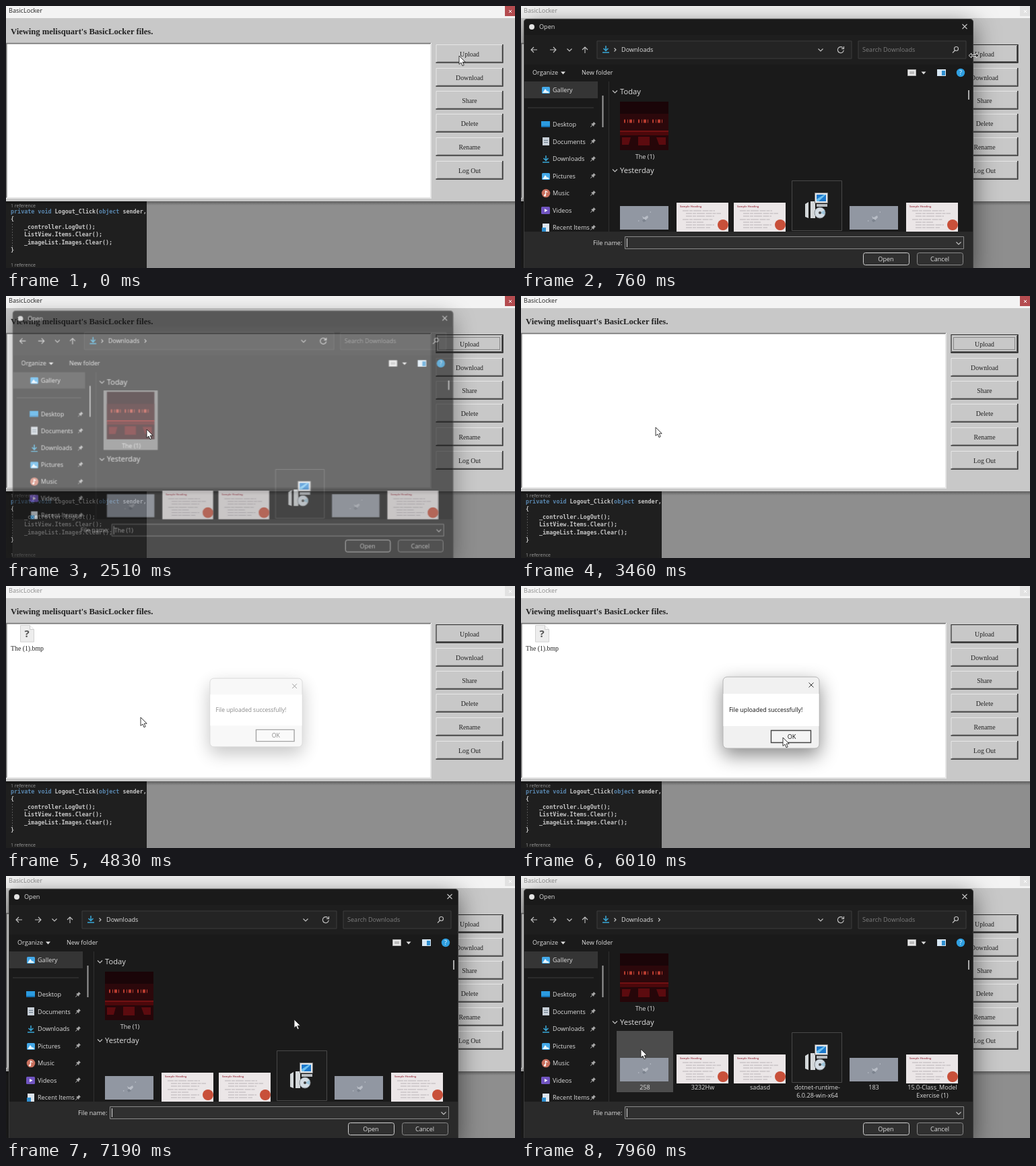
An HTML page that plays this animation: 756x389 px, repeating every 8000 ms.

```html
<!DOCTYPE html>
<html lang="en">
<head>
<meta charset="utf-8">
<title>File upload</title>
<style>
html, body { margin: 0; width: 100%; height: 100%; overflow: hidden; background: #8e8e8e; }
svg { display: block; width: 756px; height: 389px; }
text { font: 9.1px "Open Sans", "Noto Sans", sans-serif; white-space: pre; }
.serif text, text.serif { font: 9.8px "Liberation Serif", "Noto Serif", serif; fill: #222; }
.mid { text-anchor: middle; }
text.head { font: bold 12.6px "Liberation Serif", "Noto Serif", serif; }
text.group { font-size: 11.2px; }
.code text { font: bold 8.4px "DejaVu Sans Mono", "Noto Sans Mono", monospace; fill: #c8c8c8; }
.code .ref { font: 7px "Open Sans", "Noto Sans", sans-serif; fill: #9a9a9a; }
.code .key { fill: #5a88b0; }
.line { fill: none; stroke: #c4c4c4; stroke-width: 1.1; }
.light { fill: #dedede; }
.shadow { filter: drop-shadow(0 8px 18px #0008); }

.press, .dots, .focus, .off, .list, .pick, .hover, .hover2, .file, .crumb, .dialog, .box,
.cursor, .arrow, .size, .scroll { animation: 8s linear infinite; }
.press, .dots, .focus, .off, .list, .pick, .hover, .hover2, .file, .crumb,
.arrow, .size { animation-timing-function: step-end; }

.press { animation-name: press; }
@keyframes press { 0%, 2.6%, 85.6% { opacity: 0 } .86%, 83.85% { opacity: 1 } }
.focus { animation-name: focus; }
@keyframes focus { 0% { opacity: 0 } .86%, 100% { opacity: 1 } }
.dots { animation-name: dots; }
@keyframes dots { 0%, 4.3%, 59.5%, 86% { opacity: 0 } .86%, 30.4%, 77.7% { opacity: 1 } }
.off { animation-name: off; }
@keyframes off { 0%, 30.4%, 77.7% { opacity: 0 } 4.3%, 59.5%, 86% { opacity: 1 } }
.file { animation-name: file; }
@keyframes file { 0% { opacity: 0 } 59.4%, 100% { opacity: 1 } }

.dialog { animation-name: dialog; transform-origin: 337px 204px; }
@keyframes dialog {
  0%, 4.3%, 33.8%, 86% { opacity: 0; transform: scale(.92) }
  6.1%, 29.5%, 87.8%, 100% { opacity: 1; transform: none }
  31.4% { opacity: .64; transform: translate(-1px, -1px) scale(.98) }
}
.list { animation-name: list; }
@keyframes list { 0%, 34%, 86% { opacity: 0 } 6.8%, 88.5% { opacity: 1 } }
.crumb { animation-name: crumb; }
@keyframes crumb { 0%, 34% { opacity: 0 } 10.4%, 90.7% { opacity: 1 } }
.hover { animation-name: hover; }
@keyframes hover { 0%, 34% { opacity: 0 } 18.1% { opacity: 1 } }
.pick { animation-name: pick; }
@keyframes pick { 0%, 34% { opacity: 0 } 23.3% { opacity: 1 } }
.hover2 { animation-name: hover2; }
@keyframes hover2 { 0% { opacity: 0 } 94.2%, 100% { opacity: 1 } }
.scroll { animation-name: scroll; }
@keyframes scroll {
  0%, 94.2% { transform: none; animation-timing-function: ease-out }
  98%, 100% { transform: translateY(-27px) }
}

.box { animation-name: box; transform-origin: 371px 188px; }
@keyframes box {
  0%, 59.4%, 77.9%, 100% { opacity: 0; transform: scale(.92) }
  61.4%, 75.9% { opacity: 1; transform: none }
}

.cursor { animation-name: cursor; }
@keyframes cursor {
  0%, 10.4% { transform: translate(673px, 74px); animation-timing-function: ease-in-out }
  19.1%, 20.8% { transform: translate(182px, 193px) }
  22.5%, 38.2% { transform: translate(209px, 198px) }
  39.1%, 42.3% { transform: translate(202px, 196px) }
  43.2%, 62.6% { transform: translate(200px, 195px); animation-timing-function: ease-in-out }
  69.1%, 76.6% { transform: translate(389px, 225px); animation-timing-function: ease-in-out }
  82.1%, 86.6% { transform: translate(678px, 74px); animation-timing-function: ease-in-out }
  89.8%, 90.2% { transform: translate(428px, 213px); animation-timing-function: ease-in-out }
  93.3%, 100% { transform: translate(178px, 257px) }
}
.arrow { animation-name: arrow; }
@keyframes arrow { 0%, 10.9% { opacity: 1 } 6%, 10.3% { opacity: 0 } }
.size { animation-name: size; }
@keyframes size { 0%, 10.9% { opacity: 0 } 6% { opacity: 1 } }
</style>
</head>
<body>
<svg viewBox="0 0 756 389">
  <defs>
    <g id="btn">
      <path fill="#c8c8c8" d="M0 0h100v28H0z"/>
      <path fill="none" stroke="#e6e6e6" d="M.5 27V.5H99"/>
      <path fill="none" stroke="#a0a0a0" d="M2 25.5h96V2"/>
      <path fill="none" stroke="#303030" stroke-width="1.5" d="M0 27h99.3V0"/>
    </g>
    <path id="pin" fill="#aaa" d="M1-4L4-1 2 0 1 3-.6 1.2-3.6 4-4 3.6-1.2.6-3-1 0-2z"/>
    <path id="down" class="line" d="M-3.5-1.5L0 2 3.5-1.5"/>
    <g id="pic">
      <rect x="-6" y="-5" width="12" height="10" rx="1.5" fill="#43a8e8"/>
      <path fill="#eaf6ff" d="M-5 4L-1-2 2 2 3 1 5 4z"/>
    </g>
    <path id="grab" fill="none" stroke="#38a8d8" stroke-width="1.5" d="M0-5V2M-3.5-1L0 2.5 3.5-1M-5 5H5"/>
    <g id="slide">
      <path fill="#ebe6e7" d="M0 0h77v43H0z"/>
      <text x="5" y="7" style="font-size:4px;font-weight:bold" fill="#a8505c">Sample Heading</text>
      <path fill="none" stroke="#b8b2b6" stroke-dasharray="9 1 5 1 12 1.5"
        d="M9 12h48M14 16h52M14 20h42M9 25h45M14 29h26M14 33h42M14 37h36"/>
      <circle cx="69" cy="33" r="8" fill="#c8503a"/>
    </g>
    <g id="photo">
      <path fill="#9197a2" d="M0 0h72v35H0z"/>
      <path fill="#b8bdc6" d="M33 15l3 2 5-3 1 3-4 4-3-1zM44 9l2-1v2zM27 21l2 1-2 1z"/>
      <path fill="#7c838e" d="M33 21l3-2 3 3-4 2z"/>
    </g>
    <clipPath id="listClip"><path d="M131 112h541v223H131z"/></clipPath>
    <clipPath id="navClip"><path d="M4 112h126v223H4z"/></clipPath>
    <clipPath id="codeClip"><path d="M0 290h209v99H0z"/></clipPath>
    <linearGradient id="edge" x2="0" y2="1">
      <stop stop-color="#0005"/><stop offset="1" stop-color="#0000"/>
    </linearGradient>
  </defs>

  <path fill="#8e8e8e" d="M0 0h756v389H0z"/>
  <g class="code" clip-path="url(#codeClip)">
    <path fill="#1f1f1f" d="M0 290h209v99H0z"/>
    <text class="ref" x="7" y="299">1 reference</text>
    <text x="7" y="308"><tspan class="key">private void</tspan> Logout_Click(<tspan class="key">object</tspan> sender,</text>
    <text x="7" y="319">{</text>
    <text x="27" y="331">_controller.LogOut();</text>
    <text x="27" y="342">ListView.Items.Clear();</text>
    <text x="27" y="354">_imageList.Images.Clear();</text>
    <text x="7" y="365">}</text>
    <path stroke="#555" stroke-dasharray="2 2" d="M9.5 323v34"/>
    <text class="ref" x="7" y="387">1 reference</text>
  </g>
  <path fill="url(#edge)" d="M0 290h756v6H0z"/>

  <path fill="#c8c8c8" d="M0 18h756v272H0z"/>
  <path fill="#f3f3f3" d="M0 0h756v18H0z"/>
  <text x="4" y="10" fill="#222">BasicLocker</text>
  <path fill="#b44c50" d="M741 0h15v15h-15z"/>
  <path stroke="#fff" d="M747 6l4 4m0-4l-4 4"/>
  <g class="off">
    <path fill="#f3f3f3" d="M0 0h756v18H0z"/>
    <text x="4" y="10" fill="#8c8c8c">BasicLocker</text>
    <path fill="#e2e2e2" d="M741 0h15v15h-15z"/>
    <path stroke="#fff" d="M747 6l4 4m0-4l-4 4"/>
  </g>
  <text class="head" x="7" y="42" fill="#222">Viewing melisquart's BasicLocker files.</text>
  <path fill="#fff" d="M0 55h632v231H0z"/>
  <path fill="none" stroke="#777" stroke-width="1.6" d="M.8 285V55.6H631"/>
  <path fill="none" stroke="#e6e6e6" stroke-width="2" d="M1 285h630V56"/>

  <g class="file">
    <path fill="#ededed" stroke="#d2d2d2" d="M21.5 58.5h14l6 6v18.500h-20z"/>
    <path fill="#fafafa" stroke="#ccc" d="M35.5 58.5v6h6"/>
    <text class="mid" x="31" y="76" fill="#555" style="font-size:15px;font-weight:bold">?</text>
    <text class="serif mid" x="31.5" y="96">The (1).bmp</text>
  </g>

  <g class="serif mid">
    <use href="#btn" x="638.500" y="57"/><text x="688.5" y="75">Upload</text>
    <use href="#btn" x="638.500" y="92"/><text x="688.5" y="110">Download</text>
    <use href="#btn" x="638.500" y="126"/><text x="688.5" y="144">Share</text>
    <use href="#btn" x="638.500" y="160"/><text x="688.5" y="178">Delete</text>
    <use href="#btn" x="638.500" y="195"/><text x="688.5" y="213">Rename</text>
    <use href="#btn" x="638.500" y="230"/><text x="688.5" y="248">Log Out</text>
    <g class="press">
      <path fill="#c8c8c8" stroke="#777" d="M639.5 58.5h98v25h-98z"/>
      <text x="689.5" y="76">Upload</text>
    </g>
    <g class="focus" fill="none">
      <path stroke="#282828" stroke-width="1.2" d="M639 57.500h98.800v26.500H639z"/>
      <path stroke="#555" d="M640 82.500h96.500V59"/>
    </g>
    <path class="dots" fill="none" stroke="#444" stroke-dasharray="1 1" d="M642.5 61.5h91v18h-91z"/>
  </g>

  <g class="box">
    <rect x="300" y="135" width="143" height="106" rx="6" fill="#f1f1f1" stroke="#b4b4b4" style="filter:drop-shadow(0 10px 14px #0007)"/>
    <path fill="#fff" d="M300.5 160h142v48h-142z"/>
    <path stroke="#333" d="M427.5 143.5l7 7m0-7l-7 7"/>
    <text x="309" y="187" fill="#111" style="font-size:8.9px">File uploaded successfully!</text>
    <path fill="#f4f4f4" stroke="#444" stroke-width="1.4" d="M371.5 214.5h59v18h-59z"/>
    <text class="mid" x="402" y="227" fill="#111">OK</text>
  </g>

  <g class="dialog">
    <path class="shadow" fill="#1a1a1a" stroke="#3c3c3c" d="M4.5 395V24q0-4.5 4.5-4.5h658q4.5 0 4.5 4.5v371z"/>
    <path fill="#1e1e1e" d="M5 43h666v44H5z"/>
    <path fill="#2a2a2a" d="M5 335h666v60H5z"/>
    <circle cx="16" cy="31" r="4" fill="#e4e4e4"/>
    <text class="light" x="27" y="34">Open</text>
    <path class="line" d="M655.5 27l7 7m0-7l-7 7"/>

    <path class="line" d="M24 65h-9m4-4l-4 4 4 4"/>
    <path class="line" d="M43 65h9m-4-4l4 4-4 4"/>
    <use href="#down" x="72" y="65"/>
    <path class="line" d="M95 70v-9m-4 4l4-4 4 4"/>
    <g fill="#242424" stroke="#3c3c3c">
      <path d="M113 52h378v26H113z"/><path d="M501 52h160v26H501z"/>
    </g>
    <use href="#grab" x="126" y="64"/>
    <path class="line" d="M138.5 62.5l2.500 2.500-2.500 2.500"/>
    <path class="line crumb" d="M204 62.500l2.500 2.500-2.500 2.500"/>
    <text class="light" x="149" y="68">Downloads</text>
    <use href="#down" x="445" y="65"/>
    <path class="line" d="M478.5 62.5a4.500 4.500 0 1 0 .8 3M479.5 60v3.500h-3.500"/>
    <text x="507" y="68" fill="#7c7c7c">Search Downloads</text>
    <path class="line" d="M645 65.5l-4 4M649.5 63.5a3 3 0 1 1-6 0 3 3 0 0 1 6 0"/>

    <text class="light" x="17" y="102">Organize</text>
    <path class="light" d="M59 97.5h7l-3.500 4z"/>
    <text class="light" x="90" y="102">New folder</text>
    <path fill="#e8e8e8" stroke="#aaa" d="M574.5 94.5h12v9h-12z"/>
    <path fill="#bbb" d="M577 97h7v4h-7z"/>
    <path class="light" d="M594.5 97.5h7l-3.500 4z"/>
    <path fill="#d8e8f4" d="M618 94h13v10h-13z"/><path fill="#2f8fd0" d="M625 96h5v7h-5z"/>
    <circle cx="653" cy="99" r="6.2" fill="#2f9fe0"/>
    <text class="mid" x="653" y="102.3" fill="#fff">?</text>

    <g clip-path="url(#navClip)">
      <path fill="#353535" d="M5 112h109v25H5z"/>
      <path stroke="#3c3c3c" d="M10 151h98"/>
      <use href="#pic" x="37" y="125"/>
      <path fill="#2b9be0" d="M30 171h13v9H30z"/><path fill="#1672b4" d="M30 178h13v2H30z"/>
      <path fill="#c8d0d8" d="M32 195h10v12H32z"/><path stroke="#6b7c8c" d="M34 199.5h6m-6 3h6"/>
      <use href="#grab" x="37" y="227"/>
      <use href="#pic" x="37" y="253"/>
      <circle cx="37" cy="278" r="6.3" fill="#c8705e"/><path fill="none" stroke="#fff" stroke-width="1.3" d="M36.5 281v-6l3 1.5"/><circle cx="35.5" cy="281" r="1.5" fill="#fff"/>
      <rect x="30" y="298" width="13" height="11" rx="1.5" fill="#7054c0"/><path fill="#fff" d="M35 301l4.500 2.500-4.500 2.500z"/>
      <path fill="#dce4ec" d="M32 323h10v12H32z"/><path fill="#2f8fd0" d="M31 329h6v6h-6z"/>
      <g class="light">
        <text x="47" y="128">Gallery</text>
        <text x="47" y="179">Desktop</text>
        <text x="47" y="205">Documents</text>
        <text x="47" y="230">Downloads</text>
        <text x="47" y="256">Pictures</text>
        <text x="47" y="281">Music</text>
        <text x="47" y="307">Videos</text>
        <text x="47" y="332">Recent Items</text>
      </g>
      <use href="#pin" x="107" y="176"/><use href="#pin" x="107" y="201"/>
      <use href="#pin" x="107" y="227"/><use href="#pin" x="107" y="252"/>
      <use href="#pin" x="107" y="278"/><use href="#pin" x="107" y="303"/>
      <use href="#pin" x="107" y="329"/>
      <path fill="#999" d="M120.5 133h2v47h-2z"/>
    </g>
    <path stroke="#303030" d="M130.5 112v223"/>

    <g class="list" clip-path="url(#listClip)">
      <g class="scroll">
        <path class="hover" fill="#3a3a3a" d="M142 140h82v90h-82z"/>
        <path class="pick" fill="#777" d="M142 140h82v90h-82z"/>
        <path class="hover2" fill="#4c4c4c" d="M142 257h84v91h-84z"/>
        <use href="#down" x="139.5" y="127"/>
        <text class="light group" x="147" y="131">Today</text>
        <path fill="#1a0508" d="M147 142h72v72h-72z"/>
        <path fill="#2c080b" d="M147 160h72v26h-72z"/>
        <path fill="none" stroke="#b83c30" stroke-width="5" stroke-dasharray="2 3 1 2 4 2 1 6" d="M153 171h62"/>
        <path stroke="#c01c1c" stroke-width="1.2" d="M147 186h72"/>
        <path fill="#4c080b" d="M147 187h72v5h-72z"/>
        <path fill="#260609" d="M147 192h72v22h-72z"/>
        <path fill="#5c0b0f" d="M150 195h13l-3 11h-10zM174 194h17v13h-17zM201 195h14v11h-10z"/>
        <text class="light mid" x="184" y="227">The (1)</text>

        <use href="#down" x="139.5" y="244"/>
        <text class="light group" x="147" y="248">Yesterday</text>
        <use href="#photo" x="147" y="297"/><use href="#photo" x="488" y="297"/>
        <use href="#slide" x="231" y="292"/><use href="#slide" x="316" y="292"/><use href="#slide" x="572" y="292"/>
        <path fill="#1c1c1c" stroke="#484848" d="M402.5 259.5h74v74h-74z"/>
        <path fill="#d4d8da" d="M422 294l5-3v24l-5-2zM430 290h7v25h-7z"/>
        <path fill="#e4e6e8" stroke="#777" d="M436.5 277.5h19v15h-19z"/>
        <path fill="#1d79cc" d="M439 280h14v10h-14z"/><path fill="#6cc0f0" d="M439 287l11-7h3l-11 10h-3z"/>
        <path fill="#b8bcc0" d="M439 294h16v4h-16z"/>
        <circle cx="444" cy="307" r="8" fill="#d4dde4" stroke="#858c92"/>
        <path fill="#9cc4da" d="M444 307l7-4v7z"/><circle cx="444" cy="307" r="2" fill="#444"/>
        <g class="light mid">
          <text x="184" y="344">258</text>
          <text x="270" y="344">3232Hw</text>
          <text x="355" y="344">sadasd</text>
          <text x="440" y="344">dotnet-runtime-</text><text x="440" y="356">6.0.28-win-x64</text>
          <text x="524" y="344">183</text>
          <text x="611" y="344">15.0-Class_Model</text><text x="611" y="356">Exercise (1)</text>
        </g>
      </g>
      <path fill="#aaa" d="M664 125h2v14h-2z"/>
    </g>

    <text class="light" x="107" y="355">File name:</text>
    <path fill="#303030" stroke="#8a8a8a" d="M154.5 342.5h503v18h-503z"/>
    <path stroke="#ddd" d="M157.5 345v13"/>
    <text class="light pick" x="158" y="355">The (1)</text>
    <use href="#down" x="650" y="352"/>
    <g fill="#303030" stroke="#8a8a8a">
      <rect x="508.5" y="366.5" width="68" height="18" rx="3" stroke="#d0d0d0"/>
      <rect x="588.5" y="366.5" width="68" height="18" rx="3"/>
    </g>
    <g class="light mid"><text x="542" y="379">Open</text><text x="622" y="379">Cancel</text></g>
  </g>

  <g class="cursor">
    <path class="arrow" fill="#fff" stroke="#222" stroke-width=".9" d="M0 0v12.5l3-2.500 2 4.800 2.200-1L5.2 9.200h4z"/>
    <path class="size" fill="#222" stroke="#fff" stroke-width=".8" d="M-8-.5l4-3.500v2.500h7V-4L7-.5 3 3V.5h-7V3z"/>
  </g>
</svg>
</body>
</html>
```
